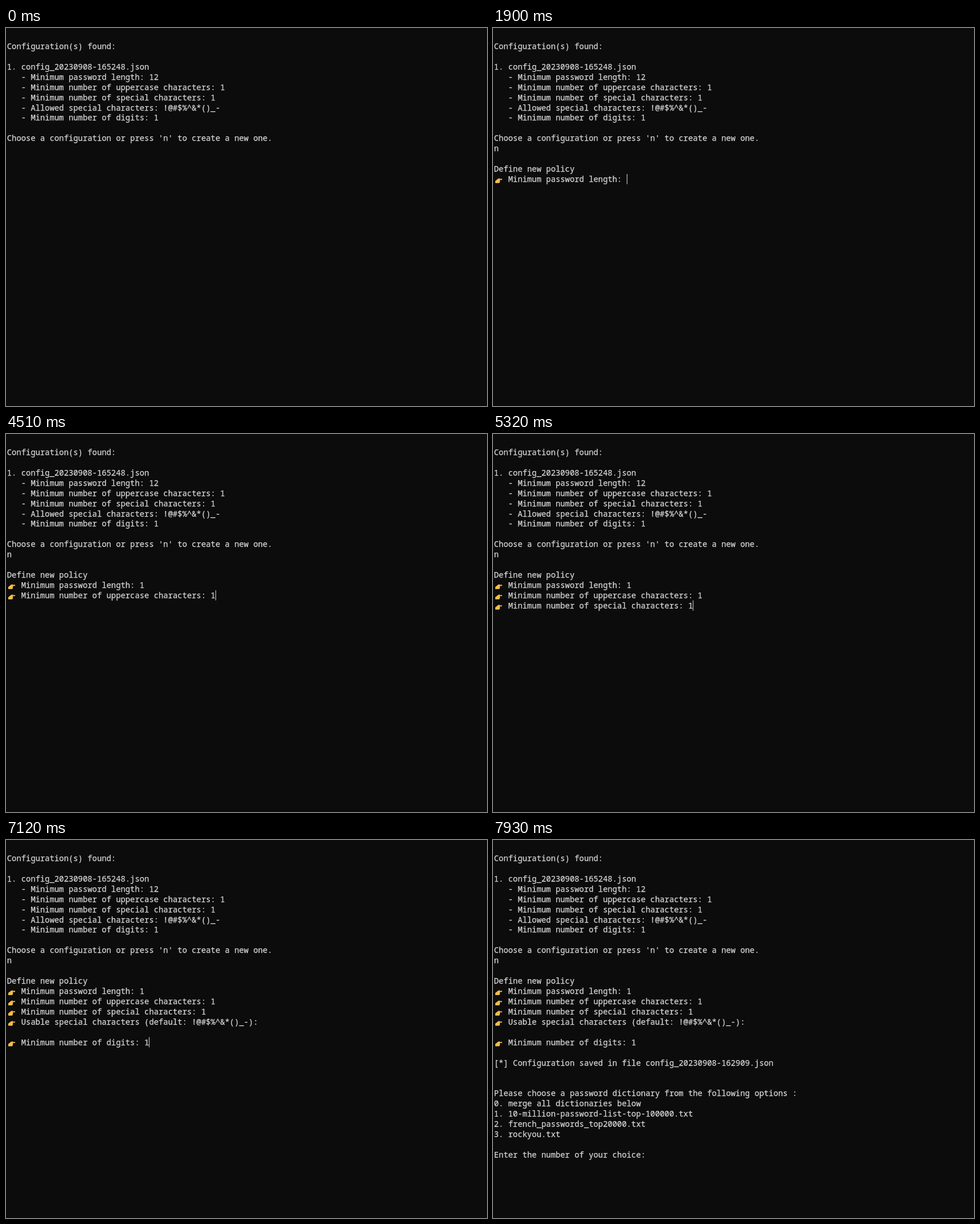
These frames come from a looping animation (845 px wide and 663 px high, 8 s). An HTML page with a canvas:

```html
<!DOCTYPE html>
<html lang="en">
<head>
<meta charset="utf-8">
<title>Password policy setup</title>
<style>
  html, body { margin: 0; width: 100%; height: 100%; overflow: hidden; background: #0c0c0c; }
  canvas { display: block; }
</style>
</head>
<body>
<canvas id="terminal" width="845" height="663"></canvas>
<script>
const canvas = document.getElementById("terminal");
const ctx = canvas.getContext("2d");
const LOOP = 8000, CURSOR_HOLD = 600;
const CELL = 8.32, ROW = 17.93, LEFT = 1.8, TOP = 5, BASELINE = 14;
const BACKGROUND = "#0c0c0c", TEXT = "#d6d6d6", HAND = "#f3bd45";

const intro = `
Configuration(s) found:

1. config_20230908-165248.json
   - Minimum password length: 12
   - Minimum number of uppercase characters: 1
   - Minimum number of special characters: 1
   - Allowed special characters: !@#$%^&*()_-
   - Minimum number of digits: 1

Choose a configuration or press 'n' to create a new one.
`;
const menu = `

[*] Configuration saved in file config_20230908-162909.json


Please choose a password dictionary from the following options :
0. merge all dictionaries below
1. 10-million-password-list-top-100000.txt
2. french_passwords_top20000.txt
3. rockyou.txt

Enter the number of your choice: `;

// Text appended at each time; every step also wakes the cursor.
const steps = [
  [390, ""],
  [1300, "n"],
  [1900, "\n\nDefine new policy\n👉 Minimum password length: "],
  [2710, ""],
  [3110, "1"],
  [3410, "\n👉 Minimum number of uppercase characters: "],
  [4510, "1"],
  [4730, "\n👉 Minimum number of special characters: "],
  [5320, "1"],
  [5520, "\n👉 Usable special characters (default: !@#$%^&*()_-):\n"],
  [6420, "\n👉 Minimum number of digits: "],
  [7120, "1"],
  [7220, menu]
];

const hand = new Path2D("M4 12.2L9 8.2L12 7.4L11.4 8.6H16V10.4H12.3L12 14.4L10.8 16H4Z");

function drawHand(y) {
  ctx.save();
  ctx.translate(0, y);
  ctx.fillStyle = HAND;
  ctx.fill(hand);
  ctx.restore();
}

// Draws one line and returns the x where it ends.
function drawLine(line, y) {
  let x = LEFT;
  for (const char of line) {
    if (char === "👉") {
      drawHand(y);
      x += CELL;
    } else {
      const baseline = Math.round(y + BASELINE);
      ctx.fillText(char, x, baseline);
      ctx.strokeText(char, x, baseline);
    }
    x += CELL;
  }
  return x;
}

function draw(now) {
  const time = now % LOOP;
  const done = steps.filter(([start]) => time >= start);
  const transcript = intro + done.map(([, text]) => text).join("");

  ctx.fillStyle = BACKGROUND;
  ctx.fillRect(0, 0, canvas.width, canvas.height);
  ctx.fillStyle = ctx.strokeStyle = TEXT;
  ctx.lineWidth = 0.25;
  ctx.font = '13.87px "Noto Sans Mono", monospace';

  let x, y;
  transcript.split("\n").forEach((line, row) => {
    y = TOP + row * ROW;
    x = drawLine(line, y);
  });

  const cursorOn = done.length && time - done.at(-1)[0] < CURSOR_HOLD;
  if (cursorOn) ctx.fillRect(Math.round(x), y, 1, ROW);
  requestAnimationFrame(draw);
}
requestAnimationFrame(draw);
</script>
</body>
</html>
```
